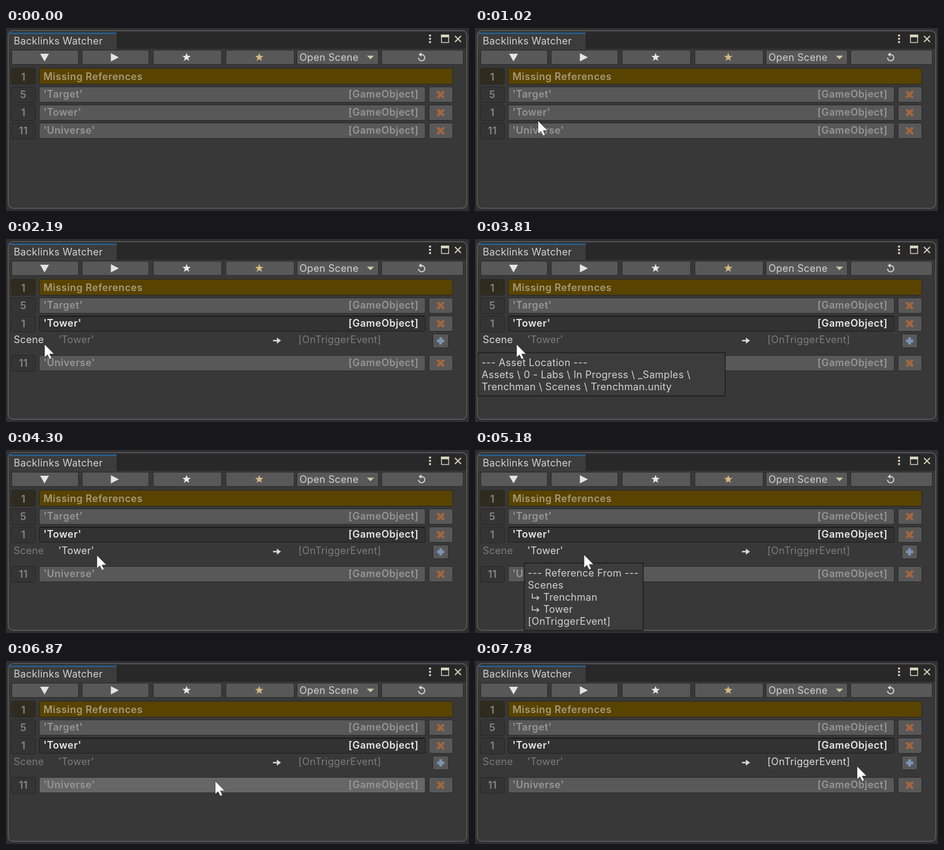
An HTML page that plays this animation: 841 px wide and 334 px high, repeating every 8000 ms.

```html
<!DOCTYPE html>
<html lang="en">
<head>
<meta charset="utf-8">
<title>Editor panel</title>
<style>
  html, body { margin: 0; width: 841px; height: 334px; overflow: hidden; background: #303030; }
  svg { display: block; }
  text { font: 400 18px Inter, "Open Sans", sans-serif; letter-spacing: .3px; fill: #d2d2d2; white-space: pre; }
  .bold { font-weight: 600; letter-spacing: .5px; fill: #969696; }
  .count { text-anchor: middle; fill: #868686; }
  .selected { fill: #e8e8e8; }
  .button { fill: #585858; stroke: #282828; }
  .box { fill: #343434; stroke: #252525; }
  .line { fill: none; stroke: #d8d8d8; stroke-width: 2; }
</style>
</head>
<body>
<svg id="stage" width="841" height="334" viewBox="0 0 841 334"></svg>
<script>
const LOOP = 8000;
const stage = document.getElementById('stage');

const rect = (x, y, w, h, attrs = '') =>
  `<rect x="${x}" y="${y}" width="${w}" height="${h}" ${attrs}/>`;
const text = (x, y, str, attrs = '') => `<text x="${x}" y="${y}" ${attrs}>${str}</text>`;
const path = (d, attrs = '') => `<path d="${d}" ${attrs}/>`;
const group = (id, body) => `<g id="${id}">${body}</g>`;
const button = (x, y, w, h, cls = 'button', attrs = '') =>
  rect(x + .5, y + .5, w - 1, h - 1, `rx="3" class="${cls}" ${attrs}`);

function star(cx, cy, r, fill) {
  const points = Array.from({ length: 10 }, (_, i) => {
    const a = i * Math.PI / 5 - Math.PI / 2, d = i % 2 ? r * .42 : r;
    return `${(cx + d * Math.cos(a)).toFixed(2)},${(cy + d * Math.sin(a)).toFixed(2)}`;
  });
  return `<polygon points="${points.join(' ')}" fill="${fill}"/>`;
}

// One result row, y is its top edge.
function row(y, count, name, id, selected) {
  const cls = `class="bold${selected ? ' selected' : ''}"`;
  return button(9, y, 45, 30, 'box') + text(31.5, y + 21, count, 'class="bold count"') +
    button(60, y, 702, 29, 'button', `id="${id}"${selected ? ' style="fill:#323232;stroke:#1d1d1d"' : ''}`) +
    (selected ? rect(62, y, 698, 1.5, 'fill="#121212"') : '') +
    text(68, y + 20, `'${name}'`, cls) + text(622, y + 20, '[GameObject]', cls) +
    button(768, y, 44, 29) +
    path(`M785 ${y + 10}l9 9m0 -9l-9 9`, 'stroke="#a2663f" stroke-width="4.6" stroke-linecap="round"');
}

function tooltip(id, x, y, w, h, body) {
  return group(id, rect(x + .5, y + .5, w - 1, h - 1, 'fill="#3c3c3c" stroke="#1b1b1b" stroke-width="1.5"') + body);
}

const branch = y => path(`M104 ${y - 13}v8h12m-4 -3.5l4 3.5l-4 3.5`, 'class="line" style="stroke-width:1.5"');

const frame =
  rect(4, 5, 833, 324, 'rx="9" fill="#383838"') +
  path('M5 38V14Q5 6 13 6H828Q836 6 836 14V38Z', 'fill="#282828"') +
  rect(5, 9, 196, 30, 'rx="3" fill="#3c3c3c"') +
  rect(5, 8, 196, 3, 'fill="#2c5d87"') +
  rect(4, 5, 833, 324, 'rx="9" fill="none" stroke="#565656" stroke-width="2"') +
  text(14, 30, 'Backlinks Watcher') +
  [12, 18, 24].map(y => rect(768.5, y, 3.5, 3.5, 'fill="#d6d3bd"')).join('') +
  path('M791 13.5V26.5H804V13.5Z', 'class="line" style="stroke:#d6d3bd;stroke-width:1.5"') +
  rect(790, 12, 15, 5, 'fill="#d6d3bd"') +
  path('M815.5 14.5l11 11m0 -11l-11 11', 'class="line" style="stroke:#d6d3bd"');

const toolbar =
  [[10, 122], [138, 122], [267, 125], [399, 125], [528, 149], [682, 149]]
    .map(([x, w]) => button(x, 40, w, 27)).join('') +
  path('M62 47H78L70 61Z', 'fill="#e4e4e4"') +
  path('M190.500 46V61L205 53.500Z', 'fill="#e4e4e4"') +
  star(328, 53.5, 8, '#e8e8e8') + star(460, 53.5, 8, '#d3b884') +
  text(533, 60, 'Open Scene') +
  path('M655.5 50.500H668.500L662 57Z', 'fill="#cfc7a8"') +
  path('M752.500 48.500H755A5.700 5.700 0 1 1 749.300 54.200', 'class="line" style="stroke-width:1.8"') +
  path('M754.500 44.500V52.500L749.500 48.500Z', 'fill="#d8d8d8"');

const header =
  button(9, 73, 45, 30, 'box', 'style="fill:#2f2c1f"') +
  text(31.5, 95.5, '1', 'class="bold count"') +
  button(60, 73, 752, 30, 'box', 'style="fill:#594300"') +
  text(68, 95, 'Missing References', 'class="bold" style="fill:#a59a78"');

const details =
  text(14, 190, 'Scene', 'id="sceneText"') +
  text(95, 190, "'Tower'", 'id="towerText"') +
  path('M485 185.500H494', 'class="line" style="stroke-width:2.6"') +
  path('M492 180L499.500 185.500L492 191Z', 'fill="#d8d8d8"') +
  text(531, 190, '[OnTriggerEvent]', 'id="eventText"') +
  button(775, 173, 29, 26) +
  path('M789.500 179.500v13m-6.500 -6.500h13', 'stroke="#7e93b8" stroke-width="5"');

stage.innerHTML = frame + toolbar + header + row(107, 5, 'Target', 'target') +
  group('closed', row(140, 1, 'Tower', 'towerClosed') + row(173, 11, 'Universe', 'universeClosed')) +
  group('open', row(140, 1, 'Tower', 'towerOpen', true) + details + row(212, 11, 'Universe', 'universeOpen')) +
  tooltip('locationTip', 5, 207, 450, 80,
    text(12, 232, '--- Asset Location ---') +
    text(12, 254, 'Assets \\ 0 - Labs \\ In Progress \\ _Samples \\') +
    text(12, 276, 'Trenchman \\ Scenes \\ Trenchman.unity')) +
  tooltip('referenceTip', 89, 206, 217, 124,
    text(96, 231, '--- Reference From ---') + text(96, 253, 'Scenes') +
    branch(275) + text(124, 275, 'Trenchman') +
    branch(297) + text(124, 297, 'Tower') + text(96, 319, '[OnTriggerEvent]')) +
  '<circle id="click" cx="144" cy="151" r="18" fill="#f4ea10"/>' +
  path('M0 0V24L5.300 19.400L9.300 27.500L13.200 25.800L9.300 17.900H17.500Z',
    'id="cursor" fill="#fff" stroke="#222" stroke-width=".7"');

const el = {};
stage.querySelectorAll('[id]').forEach(node => { el[node.id] = node; });

// Each move ticks `steps` times from `from` to `to`; keys are [time, x, y].
const moves = [
  { from: 460, to: 1230, steps: 12, keys: [[390, -6, 232], [800, 62, 204], [1230, 145, 147]] },
  { from: 1300, to: 1370, steps: 2, keys: [[1230, 145, 147], [1370, 145, 152]] },
  { from: 1710, to: 2190, steps: 8, keys: [[1640, 145, 152], [2190, 70, 192]] },
  { from: 3810, to: 4580, steps: 12, keys: [[3700, 70, 192], [4580, 195, 192]] },
  { from: 4650, to: 4850, steps: 3, keys: [[4580, 195, 192], [4850, 198, 191]] },
  { from: 6450, to: 7220, steps: 12,
    keys: [[6380, 198, 191], [6870, 380, 219], [7010, 560, 222], [7150, 700, 214], [7220, 693, 211]] },
  { from: 7290, to: 7780, steps: 8, keys: [[7220, 693, 211], [7780, 694, 192]] }
];

// Cubic Hermite through the keys, at rest at both ends.
function along(keys, t, axis) {
  const last = keys.length - 1;
  let i = 0;
  while (i < last - 1 && t > keys[i + 1][0]) i++;
  const slope = k => k <= 0 || k >= last ? 0 :
    (keys[k + 1][axis] - keys[k - 1][axis]) / (keys[k + 1][0] - keys[k - 1][0]);
  const a = keys[i], b = keys[i + 1], span = b[0] - a[0];
  const u = Math.min(1, Math.max(0, (t - a[0]) / span));
  const s = u * u * (3 - 2 * u);
  return a[axis] + (b[axis] - a[axis]) * s +
    span * (u * (1 - u) ** 2 * slope(i) - u * u * (1 - u) * slope(i + 1));
}

function cursorAt(t) {
  const move = moves.filter(m => m.from <= t).pop();
  if (!move) return null;
  const tick = (move.to - move.from) / (move.steps - 1);
  const step = Math.min(move.steps - 1, Math.floor((t - move.from) / tick + 1e-6));
  const time = move.from + step * tick;
  return { x: along(move.keys, time, 1), y: along(move.keys, time, 2) };
}

const show = (node, on) => node.setAttribute('display', on ? 'inline' : 'none');
const lit = (node, on) => { node.style.fill = on ? '#dcdcdc' : '#7c7c7c'; };
const hover = (node, on) => { node.style.fill = on ? '#666' : '#585858'; };

function render(t) {
  const p = cursorAt(t);
  const over = (x0, x1, y0, y1) => !!p && p.x >= x0 && p.x < x1 && p.y >= y0 && p.y < y1;
  const opened = t >= 1370;
  const scene = over(5, 89, 174, 205);
  const tower = over(89, 485, 174, 205);

  show(el.cursor, p);
  if (p) el.cursor.setAttribute('transform', `translate(${p.x.toFixed(1)} ${p.y.toFixed(1)})`);
  show(el.closed, !opened);
  show(el.open, opened);

  hover(el.towerClosed, t >= 1300 && over(60, 761, 140, 169));
  hover(el.universeClosed, over(60, 761, 173, 202));
  hover(el.universeOpen, over(60, 761, 212, 241));
  lit(el.sceneText, scene);
  lit(el.towerText, tower);
  lit(el.eventText, over(531, 765, 174, 205));

  show(el.locationTip, t >= 2680 && scene);
  show(el.referenceTip, t >= 5180 && tower);
  show(el.click, t >= 1300 && t < 1570);
  el.click.setAttribute('opacity', t < 1505 ? .55 : .25);
}

const start = performance.now();
function loop() {
  render((performance.now() - start) % LOOP);
  requestAnimationFrame(loop);
}
loop();
</script>
</body>
</html>
```
